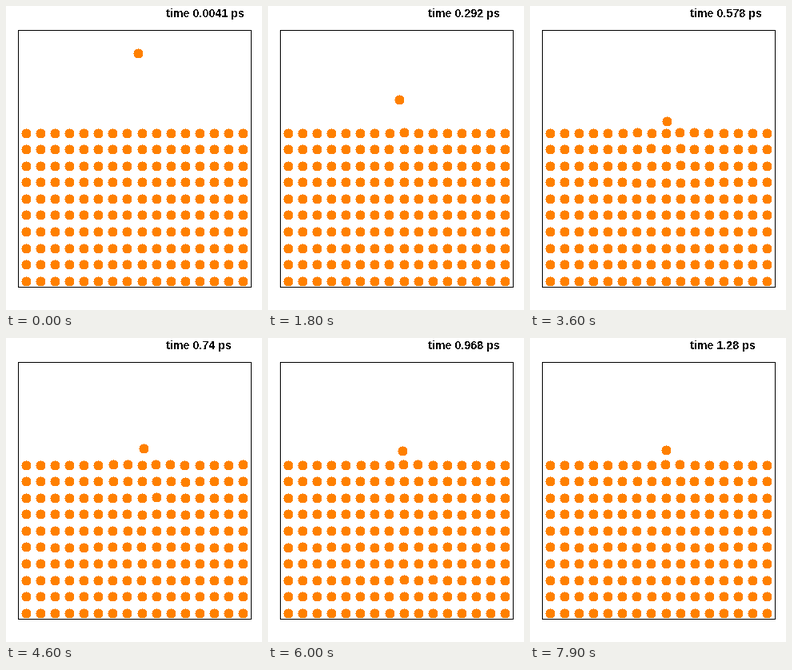
A matplotlib script for the animation above (8 s loop, 320 by 380 pixels).

```python
import numpy as np
import matplotlib.pyplot as plt
from matplotlib.animation import FuncAnimation
from matplotlib.patches import Polygon, Rectangle

W, H, DPI = 320, 380, 80
PT = 72 / DPI
FRAMES, STEP_MS = 80, 100
COLS, ROWS, RADIUS = 16, 10, 6
ORANGE = "#ff8000"
HIT = 22                                    # step at which the shock starts
CLOCK_STEPS = (0, 18, 36, 46, 60, 79)
CLOCK_PS = (.0041, .292, .578, .74, .968, 1.2758)

plt.rcParams["text.antialiased"] = False

row, col = np.mgrid[0:ROWS, 0:COLS]
rest = np.stack([25 + 18.068 * col, 158.62 + 20.57 * row], axis=-1)

rng = np.random.default_rng(5)
out = rest - (170, 148)
dist = np.hypot(out[..., 0], out[..., 1])
angle = np.arctan2(out[..., 1], out[..., 0]) + rng.uniform(-.7, .7, dist.shape)
heading = np.stack([np.cos(angle), np.sin(angle)], axis=-1)
freq = rng.uniform(.45, .75, dist.shape)


def disc(r):
    """Outline of a hard-edged disc whose right and bottom tips are cut."""
    left, right = [], []
    for y in range(-r, r):
        half = int(np.sqrt(r * r - y * y))
        end = min(half + 1, r)
        left += [(-half, y), (-half, y + 1)]
        right += [(end, y), (end, y + 1)]
    return np.array(right + left[::-1])


def ring(i, peak, period, decay):
    t = i - peak
    return np.exp(-t / decay) * np.cos(2 * np.pi * t / period)


def atom(i):
    """Straight fall that eases into a damped swing on the surface."""
    fall = np.array([165 - .055 * i, 59 + 3.22 * i])
    swing = np.array([169.7 + 2.6 * ring(i, 43, 36, 30),
                      140.1 + 5 * ring(i, 34, 24, 18)])
    s = np.clip((i - 24) / 8, 0, 1)
    s = s * s * (3 - 2 * s)
    return fall + s * (swing - fall)


def wave(i):
    """Shock that spreads from the point of impact and rings on."""
    age = np.maximum(i - HIT - dist / 7, 0)
    size = (.2 + 1.3 * np.exp(-dist / 45)) * np.minimum(age / 3, 1)
    return (size * np.exp(-age / 45) * np.sin(age * freq))[..., None] * heading


def pull(spot):
    """Lattice atoms lean towards the incoming one."""
    gap = spot - rest
    d = np.hypot(gap[..., 0], gap[..., 1])[..., None]
    return 2 * np.exp(-d / 15) * gap / d


def positions(i):
    spot = atom(i)
    lattice = rest + wave(i) + pull(spot)
    return np.round(np.vstack([lattice.reshape(-1, 2), spot]))


fig = plt.figure(figsize=(W / DPI, H / DPI), dpi=DPI, facecolor="white")
ax = fig.add_axes([0, 0, 1, 1])
ax.set(xlim=(0, W), ylim=(H, 0))
ax.axis("off")
ax.add_patch(Rectangle((15, 30), 291, 321, fill=False, ec="black",
                       lw=PT, aa=False, snap=True))
shape = disc(RADIUS)
dots = [ax.add_patch(Polygon(shape, fc=ORANGE, ec="none", lw=0, aa=False))
        for _ in range(COLS * ROWS + 1)]
label = ax.text(200, 14, "", family="Liberation Sans", weight="bold",
                size=14.3 * PT, color="black")


def draw(i):
    for dot, spot in zip(dots, positions(i)):
        dot.set_xy(shape + spot)
    label.set_text(f"time {np.interp(i, CLOCK_STEPS, CLOCK_PS):.3g} ps")
    return [*dots, label]


anim = FuncAnimation(fig, draw, frames=FRAMES, interval=STEP_MS,
                     repeat=True, repeat_delay=0, blit=False)
plt.show()
```
